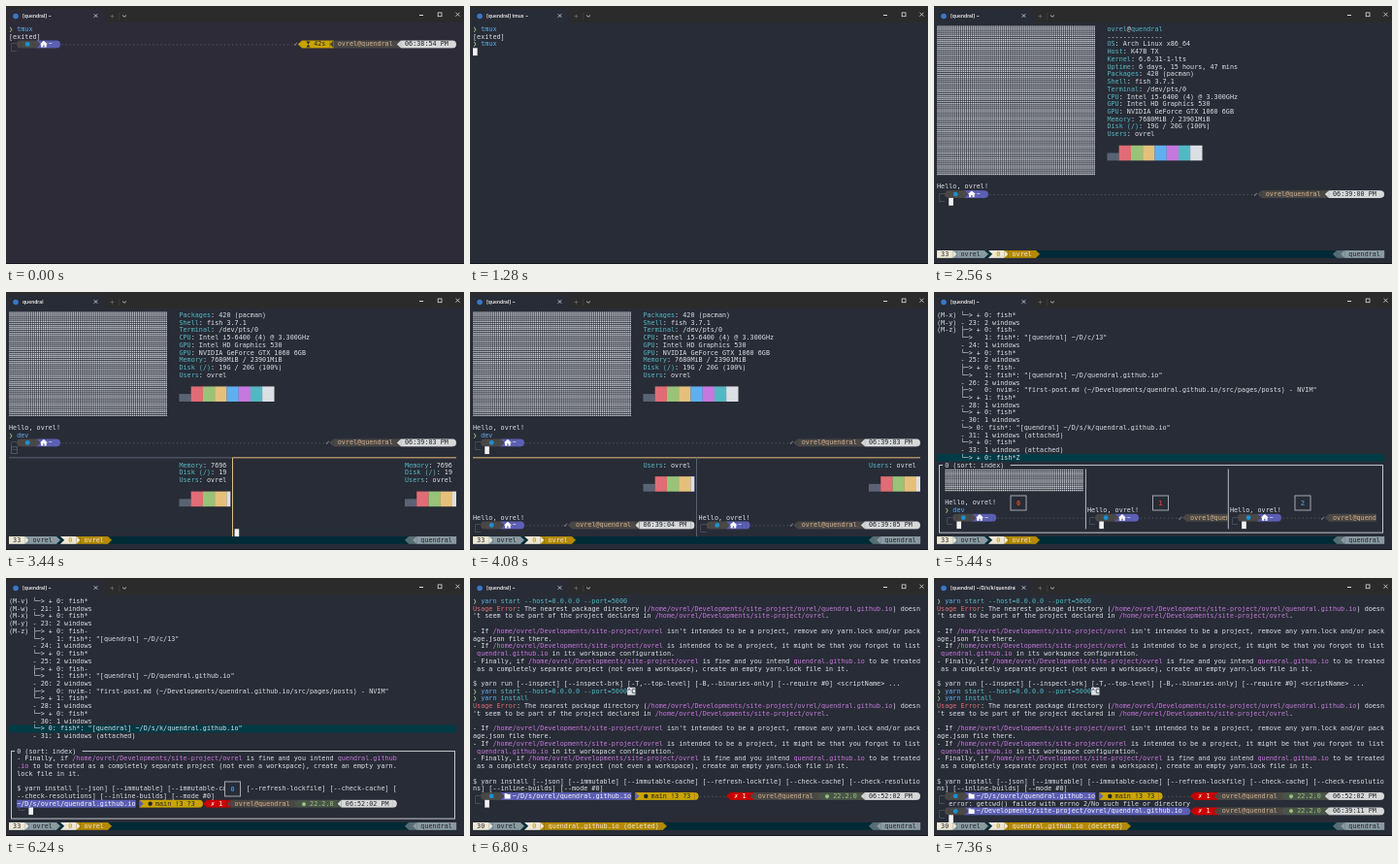
These frames come from a looping animation (472x266 px, 8000 ms). An HTML page with a canvas:

```html
<!DOCTYPE html>
<html>
<head>
<meta charset="utf-8">
<style>
html, body { margin: 0; width: 472px; height: 266px; overflow: hidden; background: #282c36; }
canvas { display: block; }
</style>
</head>
<body>
<canvas id="stage" width="472" height="266"></canvas>
<script>
const ctx = document.getElementById('stage').getContext('2d');
const LOOP = 8000, CW = 4.08, RH = 7.73, COLS = 113;
const X = c => 3 + c * CW, Y = r => 20.1 + r * RH;
const USER = 'ovrel', HOST = 'quendral', SITE = HOST + '.github.io';
const WORK = `/home/${USER}/Developments/site-project/${USER}`;
const C = {
  fg: '#dcdfe4', dim: '#5a6374', red: '#e06c75', green: '#98c379', yellow: '#e5c07b',
  blue: '#61afef', magenta: '#c678dd', cyan: '#56b6c2', ink: '#23262c', seg: '#4a4846',
  dir: '#5c5fb4', gold: '#c9a400', cream: '#eee8d5', slate: '#8a9aa2', teal: '#002b36', amber: '#b58900'
};
let bg;

// ---- primitives on the character grid ----
function rect(x, y, w, h, color) { ctx.fillStyle = color; ctx.fillRect(x, y, w, h); }
function cells(c, r, n, color, rows = 1) { rect(X(c), Y(r), n * CW + .15, rows * RH + .1, color); }
function poly(color, ...p) {
  ctx.fillStyle = color;
  ctx.beginPath();
  for (let i = 0; i < p.length; i += 2) ctx.lineTo(p[i], p[i + 1]);
  ctx.fill();
}
function disc(x, y, radius, color) {
  ctx.fillStyle = color;
  ctx.beginPath();
  ctx.arc(x, y, radius, 0, 7);
  ctx.fill();
}
function line(color, x1, y1, x2, y2, w = 1) {
  ctx.strokeStyle = color;
  ctx.lineWidth = w;
  ctx.beginPath();
  ctx.moveTo(x1, y1);
  ctx.lineTo(x2, y2);
  ctx.stroke();
}
// Large font scaled down keeps fractional glyph advances.
function glyphs(str, x, y, color, font) {
  ctx.save();
  ctx.translate(x, y);
  ctx.scale(.1, .1);
  ctx.font = font;
  ctx.fillStyle = color;
  ctx.fillText(str, 0, 0);
  ctx.restore();
}
function text(c, r, str, color = C.fg) {
  glyphs(str, X(c), Y(r) + 5.9, color, '67.77px "DejaVu Sans Mono", monospace');
}
// Parts are [text, color] pairs that flow through a block of the given width.
function flow(c, r, width, parts) {
  let col = 0;
  for (const [str, color] of parts) {
    str.split('\n').forEach((chunk, i) => {
      if (i) { r++; col = 0; }
      while (chunk) {
        if (col === width) { r++; col = 0; }
        const piece = chunk.slice(0, width - col);
        text(c + col, r, piece, color);
        col += piece.length;
        chunk = chunk.slice(piece.length);
      }
    });
  }
}
function arrow(c, r, color, right, under) {
  if (under) cells(c, r, 1, under);
  const a = X(right ? c : c + 1), b = X(right ? c + 1 : c), y = Y(r);
  poly(color, a, y, b, y + RH / 2, a, y + RH);
}
function cap(c, r, color, right) {
  ctx.fillStyle = color;
  ctx.beginPath();
  ctx.ellipse(X(right ? c : c + 1), Y(r) + RH / 2, CW, RH / 2, 0, -Math.PI / 2, Math.PI / 2, !right);
  ctx.fill();
}
function cursor(c, r) { cells(c, r, 1.1, '#f2f2f2'); }
function clip(c1, r1, c2, r2, draw) {
  ctx.save();
  ctx.beginPath();
  ctx.rect(X(c1), Y(r1), X(c2) - X(c1), Y(r2) - Y(r1));
  ctx.clip();
  draw();
  ctx.restore();
}

// ---- shell pieces ----
function command(c, r, cmd, args = '') {
  text(c, r, '❯', C.green);
  text(c + 2, r, cmd, C.blue);
  if (args) text(c + 3 + cmd.length, r, args, C.cyan);
}
function home(x, y) {
  poly('#fff', x - 4, y, x, y - 3.6, x + 4, y);
  rect(x - 2.8, y - .3, 5.6, 3.4, '#fff');
  rect(x - .7, y + 1, 1.4, 2.1, C.dir);
}
function prompt(c, r, w, time, { dir = '~', git, took, err } = {}) {
  const mid = Y(r) + RH / 2;
  text(c, r, '╭─', C.dim);
  text(c, r + 1, '╰─', C.dim);
  cap(c + 2, r, C.seg, false);
  cells(c + 3, r, 4, C.seg);
  disc(X(c + 4.7), mid, 2.4, '#1793d1');
  let end = c + 10 + dir.length;
  cells(c + 7, r, end - c - 7, C.dir);
  arrow(c + 7, r, C.seg, true);
  if (dir === '~') home(X(c + 8.8), mid);
  else {
    rect(X(c + 8), mid - 2, 6, 4.6, '#fff');
    rect(X(c + 8), mid - 2.8, 2.6, 1, '#fff');
  }
  text(c + 10, r, dir, '#f4f4f6');
  if (git) {
    cells(end + 1, r, 15, C.gold);
    arrow(end + 1, r, C.dir, true);
    disc(X(end + 3.7), mid, 2.2, C.ink);
    text(end + 5, r, 'main !3 ?3', C.ink);
    end += 16;
    cap(end, r, C.gold, true);
  } else {
    cells(end, r, 1, C.dir);
    end += dir === '~' ? 1 : 0;
    cap(end + (dir === '~' ? 0 : 1), r, C.dir, true);
  }
  end += 1;

  const segs = [[` ${time} `, '#d6d8d8', C.ink]];
  if (err) segs.push([' ● 22.2.0 ', '#4a5549', C.green]);
  segs.push([` ${USER}@${HOST} `, C.seg, '#d7af87']);
  if (err) segs.push([' ✗ 1 ', '#cc0000', '#fff']);
  if (took) segs.push([`   ${took} `, C.gold, C.ink]);
  let pos = c + w - 1;
  cap(pos, r, segs[0][1], true);
  segs.forEach(([label, fill, ink], i) => {
    pos -= label.length;
    cells(pos, r, label.length, fill);
    text(pos, r, label, ink);
    arrow(--pos, r, fill, false, segs[i + 1] && segs[i + 1][1]);
  });
  if (took) {
    const x = X(pos + 2.6);
    poly(C.ink, x - 2, mid - 3, x + 2, mid - 3, x - 2, mid + 3, x + 2, mid + 3);
  }
  if (!err) text(--pos, r, '✔', '#7d8a84');
  for (; end < pos; end++) rect(X(end) + 1.5, mid, 1.2, 1, '#535966');
}
function status(session, label = USER) {
  const r = 30, end = 20 + label.length;
  cells(0, r, COLS, C.teal);
  cells(0, r, 4, C.cream);
  text(1, r, session, C.ink);
  arrow(4, r, C.cream, true, C.slate);
  cells(5, r, 7, C.slate);
  text(6, r, USER, C.ink);
  arrow(12, r, C.slate, true);
  cells(13, r, 4, C.cream);
  arrow(13, r, C.teal, true);
  text(15, r, '0', C.amber);
  arrow(17, r, C.cream, true, C.amber);
  cells(18, r, end - 18, C.amber);
  text(19, r, label, C.cream);
  arrow(end, r, C.amber, true);
  arrow(100, r, '#586e75', false);
  cells(101, r, 2, '#586e75');
  arrow(102, r, C.slate, false);
  cells(103, r, 10, C.slate);
  text(104, r, HOST, C.ink);
}

// ---- system information ----
const INFO = [
  ['OS', 'Arch Linux x86_64'], ['Host', 'K47B TX'], ['Kernel', '6.6.31-1-lts'],
  ['Uptime', '6 days, 15 hours, 47 mins'], ['Packages', '420 (pacman)'], ['Shell', 'fish 3.7.1'],
  ['Terminal', '/dev/pts/0'], ['CPU', 'Intel i5-6400 (4) @ 3.300GHz'], ['GPU', 'Intel HD Graphics 530'],
  ['GPU', 'NVIDIA GeForce GTX 1060 6GB'], ['Memory', '7680MiB / 23901MiB'],
  ['Disk (/)', '19G / 20G (100%)'], ['Users', USER]
];
function field(c, r, key, value) {
  text(c, r, key, C.cyan);
  text(c + key.length, r, ': ' + value);
}
function palette(c, r, narrow) {
  cells(c, r + 1, 3, C.dim);
  const hues = [C.red, C.green, C.yellow, C.blue, C.magenta, C.cyan, C.fg];
  if (narrow) {
    hues.slice(0, 3).forEach((h, i) => cells(c + 3 + i * 3, r, 3, h, 2));
    cells(c + 12, r, 1, C.fg, 2);
  } else hues.forEach((h, i) => cells(c + 3 + i * 3, r, 3, h, 2));
}
function dots(c, r, cols, rows) {
  ctx.fillStyle = '#d5d8de';
  ctx.beginPath();
  for (let j = 0; j < rows * 4; j++)
    for (let i = 0; i < cols * 2; i++)
      ctx.rect(X(c) + i * CW / 2 + .3, Y(r) + j * RH / 4 + .3, 1.4, 1.3);
  ctx.fill();
}
function fetchInfo(scroll, blocks) {
  clip(0, 0, COLS, 20, () => {
    dots(0, 0, 40, 20 - scroll);
    text(43, -scroll, USER, C.cyan);
    text(43 + USER.length, -scroll, '@');
    text(44 + USER.length, -scroll, HOST, C.cyan);
    text(43, 1 - scroll, '-'.repeat(14));
    INFO.forEach(([k, v], i) => field(43, 2 + i - scroll, k, v));
    if (blocks) palette(43, 16 - scroll);
  });
}
function greet(c, r) { text(c, r, `Hello, ${USER}!`); }

// ---- scenes ----
function plainShell(t) {
  command(0, 0, 'tmux');
  text(0, 1, '[exited]');
  if (t < 1040) {
    prompt(0, 2, COLS, '06:38:54 PM', { took: '42s' });
    const typed = 'tmux'.slice(0, Math.max(0, Math.floor((t - 80) / 160)));
    text(3, 3, typed, C.blue);
    if (typed) cursor(3 + typed.length, 3);
  } else {
    command(0, 2, 'tmux');
    cursor(0, 3);
  }
}
function freshSession(t) {
  status('33');
  if (t < 1440) return cursor(0, 0);
  fetchInfo(0, t >= 1760);
  if (t < 2080) return cursor(0, 19);
  greet(0, 21);
  if (t >= 3120) {
    command(0, 22, 'dev');
    return cursor(0, 23);
  }
  prompt(0, 22, COLS, '06:39:00 PM');
  const typed = t >= 3040 ? 'dev' : '';
  text(3, 23, typed, C.blue);
  cursor(3 + typed.length, 23);
}
function smallPane(c, done, time) {
  clip(c, 20, c + 56, 30, () => {
    const r = done ? 18 : 20;
    field(c + 43, r, 'Memory', '7696');
    field(c + 43, r + 1, 'Disk (/)', '19');
    field(c + 43, r + 2, 'Users', USER);
    palette(c + 43, r + 4, true);
    if (done) {
      greet(c, 27);
      prompt(c, 28, 56, time);
    }
  });
}
function splitPanes(t) {
  status('33');
  fetchInfo(6, true);
  greet(0, 15);
  command(0, 16, 'dev');
  prompt(0, 17, COLS, '06:39:03 PM');
  const first = t >= 4080, y = Y(19) + RH / 2, x = X(56.5);
  line(first ? C.yellow : C.dim, X(0), y, x, y);
  line(C.yellow, x, y, X(COLS), y);
  line(first ? C.dim : C.yellow, x, y, x, Y(30));
  if (t >= 3360) {
    smallPane(0, t >= 3680, '06:39:04 PM');
    smallPane(57, t >= 4000, '06:39:05 PM');
  }
  if (first) return cursor(3, 18);
  ctx.strokeStyle = C.dim;
  ctx.lineWidth = .8;
  ctx.strokeRect(X(.6), Y(18) + .5, 6, RH - 1);
  cursor(t >= 4000 ? 60 : 57, 29);
}

const TREE = [
  '└─> + 0: fish*', '- 21: 1 windows', '└─> + 0: fish*', '- 23: 2 windows', '├─> + 0: fish-',
  `└─>   1: fish*: "[${HOST}] ~/D/c/13"`, '- 24: 1 windows', '└─> + 0: fish*', '- 25: 2 windows',
  '├─> + 0: fish-', `└─>   1: fish*: "[${HOST}] ~/D/${SITE}"`, '- 26: 2 windows',
  `├─>   0: nvim-: "first-post.md (~/Developments/${SITE}/src/pages/posts) - NVIM"`,
  '└─> + 1: fish*', '- 28: 1 windows', '└─> + 0: fish*', '- 30: 1 windows',
  `└─> 0: fish*: "[${HOST}] ~/D/s/k/${SITE}"`, '- 31: 1 windows (attached)', '└─> + 0: fish*',
  '- 33: 1 windows (attached)', '└─> + 0: fish*Z'
];
function badge(x, label, color) {
  rect(x - 8.5, Y(24.5), 17, 15.5, bg);
  ctx.strokeStyle = '#a3a8b0';
  ctx.lineWidth = 1;
  ctx.strokeRect(x - 8, Y(24.5) + .5, 16, 15);
  glyphs(label, x - 2, 219.5, color, 'bold 67.77px "DejaVu Sans Mono", monospace');
}
function panePreview() {
  clip(2, 21, 37.5, 29, () => {
    dots(2, 21, 35, 3);
    greet(2, 25);
    command(2, 26, 'dev');
    prompt(2, 27, COLS, '06:39:03 PM');
    cursor(5, 28);
  });
  [38, 74].forEach((c, i) => clip(c, 21, c + [35.5, 37][i], 29, () => {
    greet(c, 26);
    prompt(c, 27, 56, '06:39:05 PM');
    cursor(c + 3, 28);
  }));
  for (const c of [37.6, 73.6]) line('#b5bac2', X(c), Y(21), X(c), Y(29));
  badge(87, '0', '#d9541e');
  badge(233.5, '1', '#d33b3b');
  badge(380, '2', '#3f8fd0');
}
function sitePreview() {
  clip(2, 21, 111, 29, () => {
    flow(2, 21, 96, [...FINALLY, ...INSTALL]);
    prompt(-8, 27, 106, '06:52:02 PM', { dir: `~/D/s/${USER}/${SITE}`, git: true, err: true });
    text(2, 28, '╰─', C.dim);
    cursor(5, 28);
  });
  badge(233.5, '0', '#3f8fd0');
}
function tree(t) {
  const picked = 21 - [5520, 5680, 5840, 6000].filter(at => t >= at).length;
  const top = t >= 6000 ? 0 : 2, pick = picked - top;
  cells(0, pick, COLS, '#003b46');
  TREE.slice(top, top + (top ? 20 : 19)).forEach((item, i) => {
    if (i < 5 - top) text(0, i, `(M-${'vwxyz'[i + top]})`);
    text(6, i, item);
  });
  const x = 5.5, y = Y(20) + RH / 2, right = 462.5, bottom = Y(29) + RH / 2;
  ctx.strokeStyle = '#c3c7cd';
  ctx.lineWidth = 1;
  ctx.strokeRect(x, y, right - x, bottom - y);
  cells(1.5, 20, 17, bg);
  text(2, 20, '0 (sort: index)');
  if (t >= 6000) sitePreview(); else panePreview();
  status('33');
}

const path = [WORK, C.magenta], site = [SITE, C.magenta];
const FINALLY = [
  ['- Finally, if '], path, [' is fine and you intend '], site,
  [' to be treated as a completely separate project (not even a workspace), create an empty yarn.lock file in it.\n\n']
];
const INSTALL = [['$ yarn install [--json] [--immutable] [--immutable-cache] [--refresh-lockfile] ' +
  '[--check-cache] [--check-resolutions] [--inline-builds] [--mode #0]']];
const USAGE = [
  ['Usage Error', C.red], [': The nearest package directory ('], [`${WORK}/${SITE}`, C.magenta],
  [") doesn't seem to be part of the project declared in "], path, ['.\n\n- If '], path,
  [" isn't intended to be a project, remove any yarn.lock and/or package.json file there.\n- If "], path,
  [' is intended to be a project, it might be that you forgot to list '], site,
  [' in its workspace configuration.\n'], ...FINALLY
];
function siteSession(t) {
  const start = '--host=0.0.0.0 --port=5000';
  command(0, 0, 'yarn', 'start ' + start);
  flow(0, 1, COLS, [...USAGE,
    ['$ yarn run [--inspect] [--inspect-brk] [-T,--top-level] [-B,--binaries-only] [--require #0] <scriptName> ...']]);
  command(0, 12, 'yarn', 'start ' + start);
  cells(39, 12, 2, C.fg);
  text(39, 12, '^C', C.ink);
  command(0, 13, 'yarn', 'install');
  flow(0, 14, COLS, [...USAGE, ...INSTALL]);
  prompt(0, 26, COLS, '06:52:02 PM', { dir: `~/D/s/${USER}/${SITE}`, git: true, err: true });
  if (t >= 7120) {
    text(3, 27, 'error: getcwd() failed with errno 2/No such file or directory');
    prompt(0, 28, COLS, '06:39:11 PM', { dir: `~/Developments/site-project/${USER}/${SITE}`, err: true });
    cursor(3, 29);
  } else cursor(3, 27);
  status('30', SITE + ' (deleted)');
}

function titleAt(t) {
  if (t >= 1040 && t < 2000) return `[${HOST}] tmux ~`;
  if (t >= 3280 && t < 4080) return HOST;
  return t >= 7040 ? `[${HOST}] ~/D/s/k/${HOST}` : `[${HOST}] ~`;
}
function windowFrame(t) {
  rect(0, 0, 472, 17, '#2b2b2b');
  ctx.fillStyle = bg;
  ctx.beginPath();
  ctx.roundRect(0, 3, 102, 15, [3, 3, 0, 0]);
  ctx.fill();
  disc(10, 10.5, 2.8, '#3b78c4');
  ctx.save();
  ctx.beginPath();
  ctx.rect(17, 3, 67, 14);
  ctx.clip();
  glyphs(titleAt(t), 17, 12.4, '#f0f0f0', '600 50px Inter, sans-serif');
  ctx.restore();
  const cross = (x, y, s) => {
    line('#dcdcdc', x - s, y - s, x + s, y + s, .8);
    line('#dcdcdc', x - s, y + s, x + s, y - s, .8);
  };
  cross(92.5, 10, 1.8);
  line('#666', 107.5, 10.5, 111.5, 10.5, .8);
  line('#666', 109.5, 8.5, 109.5, 12.5, .8);
  line('#454545', 116.5, 7, 116.5, 14, .6);
  line('#dcdcdc', 120, 9.5, 122, 11.3, .8);
  line('#dcdcdc', 122, 11.3, 124, 9.5, .8);
  line('#dcdcdc', 426, 9.5, 430, 9.5);
  ctx.strokeStyle = '#dcdcdc';
  ctx.lineWidth = .8;
  ctx.strokeRect(445.2, 6.9, 3.8, 3.8);
  cross(465.5, 8.7, 2);
  rect(0, 265, 472, 1, '#15161a');
}

function render(t) {
  bg = t < 1200 ? '#2d2b38' : '#282c36';
  rect(0, 0, 472, 266, bg);
  const scenes = [[1360, plainShell], [3280, freshSession], [4640, splitPanes], [6400, tree], [LOOP, siteSession]];
  scenes.find(([until]) => t < until)[1](t);
  windowFrame(t);
}
function tick() {
  render(performance.now() % LOOP);
  requestAnimationFrame(tick);
}
tick();
</script>
</body>
</html>
```
